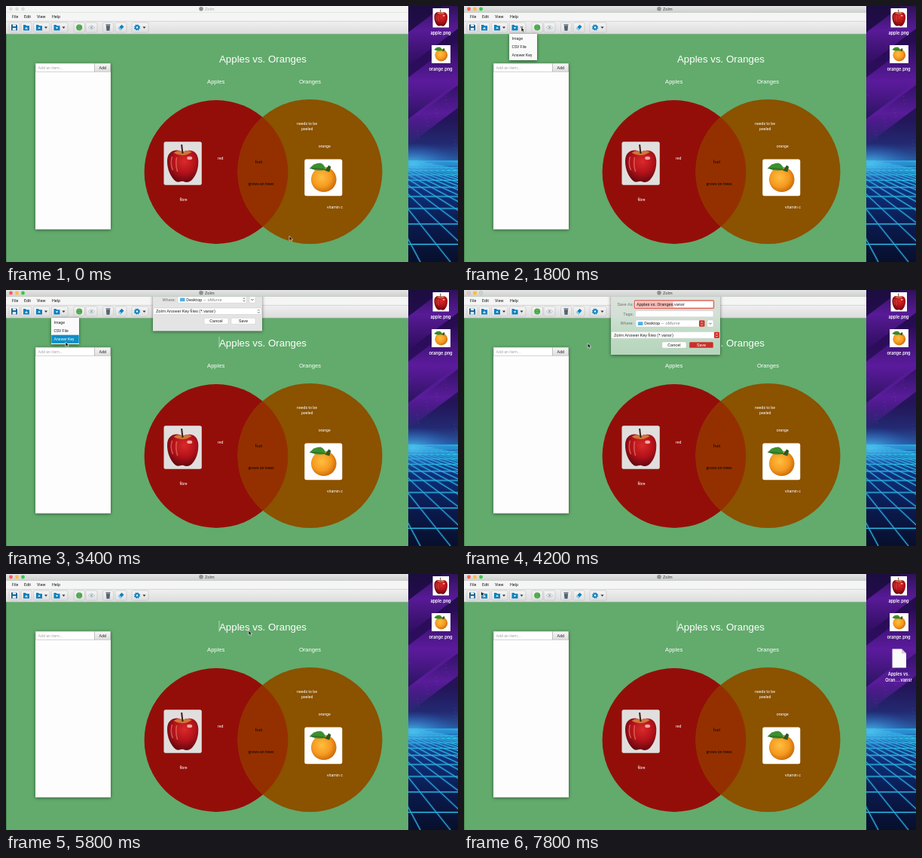
An HTML page for the animation above (8 s loop, 600x340 px).

```html
<!DOCTYPE html>
<html lang="en">
<head>
<meta charset="utf-8">
<title>Diagram editor</title>
<style>
html, body { margin: 0; width: 100%; height: 100%; overflow: hidden; background: #62ab6c; }
svg { display: block; width: 100vw; height: 100vh; }
text { font-family: Roboto, sans-serif; font-size: 5.3px; white-space: pre; }
.head { font-family: "Liberation Sans", Arial, sans-serif; }
.icon { font-family: Inter, sans-serif; font-weight: 600; font-size: 5.6px; }
</style>
</head>
<body>
<svg id="stage" viewBox="0 0 600 340">
  <defs>
    <linearGradient id="sky" x2="0" y2="1">
      <stop offset="0" stop-color="#1c0d40"/><stop offset=".3" stop-color="#2a0c58"/>
      <stop offset=".5" stop-color="#2f0f62"/><stop offset=".72" stop-color="#241458"/>
      <stop offset=".88" stop-color="#232a72"/><stop offset="1" stop-color="#2a62a8"/>
    </linearGradient>
    <linearGradient id="ray" x2="0" y2="1">
      <stop offset="0" stop-color="#6a1fb0" stop-opacity="0"/><stop offset=".5" stop-color="#6a1fb0" stop-opacity=".75"/>
      <stop offset="1" stop-color="#6a1fb0" stop-opacity="0"/>
    </linearGradient>
    <radialGradient id="glow">
      <stop offset="0" stop-color="#4fc4f0" stop-opacity=".85"/><stop offset="1" stop-color="#2a6ad0" stop-opacity="0"/>
    </radialGradient>
    <linearGradient id="floor" x2="0" y2="1">
      <stop offset="0" stop-color="#1d67b0"/><stop offset=".3" stop-color="#0e2f78"/>
      <stop offset=".65" stop-color="#0a1a4c"/><stop offset="1" stop-color="#070f2c"/>
    </linearGradient>
    <linearGradient id="glass" x2="0" y2="1">
      <stop offset="0" stop-color="#dde3de"/><stop offset=".35" stop-color="#d3e0d5"/>
      <stop offset=".65" stop-color="#bfdac4"/><stop offset="1" stop-color="#b6d5bb"/>
    </linearGradient>
    <linearGradient id="bar" x2="0" y2="1">
      <stop offset="0" stop-color="#e6e5e6"/><stop offset="1" stop-color="#d0cfd0"/>
    </linearGradient>
    <linearGradient id="tool" x2="0" y2="1">
      <stop offset="0" stop-color="#f0f0f0"/><stop offset="1" stop-color="#dcdcdc"/>
    </linearGradient>
    <linearGradient id="btn" x2="0" y2="1">
      <stop offset="0" stop-color="#f6f6f6"/><stop offset="1" stop-color="#dedede"/>
    </linearGradient>
    <radialGradient id="redSkin" cx=".55" cy=".35" r=".65">
      <stop offset="0" stop-color="#d92a2a"/><stop offset=".55" stop-color="#b3121a"/>
      <stop offset="1" stop-color="#650710"/>
    </radialGradient>
    <radialGradient id="peel" cx=".42" cy=".42" r=".62">
      <stop offset="0" stop-color="#ffbe40"/><stop offset=".6" stop-color="#f59a20"/>
      <stop offset="1" stop-color="#c96808"/>
    </radialGradient>
    <filter id="shade" x="-20%" y="-20%" width="140%" height="140%">
      <feDropShadow dx="0" dy="1" stdDeviation="2" flood-opacity=".5"/>
    </filter>
    <clipPath id="left"><circle cx="279" cy="220.5" r="95.4"/></clipPath>
    <clipPath id="desk"><rect x="534" width="66" height="340"/></clipPath>
    <clipPath id="ground"><rect x="534" y="205" width="66" height="135"/></clipPath>
    <clipPath id="below"><rect y="9" width="600" height="331"/></clipPath>
    <symbol id="apple" viewBox="0 0 50 58" preserveAspectRatio="none">
      <path d="M25 14C18 9 5 11 4.5 25C4 36 9 48 16 53C20 55 22 52 26 53C30 55 34 54 37 51C43 45 46 35 45.5 25C45 12 34 9 25 14Z" fill="url(#redSkin)"/>
      <path d="M13 15Q25 22 37 14Q31 10 25 14Q19 10 13 15Z" fill="#d0763a"/>
      <path d="M11 20Q8 29 12 38M17 21Q15 30 18 40" stroke="#ef8468" stroke-width="1.6" fill="none" opacity=".6"/>
      <ellipse cx="34" cy="22" rx="3.5" ry="2.2" fill="#ffd5cc" opacity=".75"/>
      <path d="M25 16Q24 10 23.5 4" stroke="#3a1d18" stroke-width="2" fill="none"/>
    </symbol>
    <symbol id="orange" viewBox="0 0 50 49" preserveAspectRatio="none">
      <circle cx="25.5" cy="27" r="16.8" fill="url(#peel)"/>
      <path d="M28 14Q17 17 7 12Q12 5 21 5Q27 7 28 14Z" fill="#3c8f2f"/>
      <path d="M28 14Q18 12 7 12" stroke="#1f5a22" stroke-width=".8" fill="none"/>
      <path d="M27 15L32 8L35 10L33 17Z" fill="#2c5a22"/>
    </symbol>
  </defs>
  <g id="scene"></g>
</svg>
<script>
const $ = id => document.getElementById(id);
const rect = (x, y, w, h, fill, more = '') => `<rect x="${x}" y="${y}" width="${w}" height="${h}" fill="${fill}" ${more}/>`;
const disc = (x, y, r, fill, more = '') => `<circle cx="${x}" cy="${y}" r="${r}" fill="${fill}" ${more}/>`;
const path = (d, fill, more = '') => `<path d="${d}" fill="${fill}" ${more}/>`;
const line = (d, color, w = 1) => path(d, 'none', `stroke="${color}" stroke-width="${w}"`);
const text = (x, y, s, fill = '#222', more = '') => `<text x="${x}" y="${y}" fill="${fill}" ${more}>${s}</text>`;
const mid = 'text-anchor="middle"', end = 'text-anchor="end"';
const size = n => `style="font-size:${n}px"`;
const use = (id, x, y, w, h) => `<use href="#${id}" x="${x}" y="${y}" width="${w}" height="${h}"/>`;
const group = (id, body, more = '') => `<g id="${id}" ${more}>${body}</g>`;
const range = n => [...Array(n).keys()];

function desktop() {
  const ray = (y, h) => path(`M534 ${y}L600 ${y - 50}V${y - 50 + h}L534 ${y + h}Z`, 'url(#ray)');
  const stars = range(16).map(i => disc(536 + i * 37 % 62, 118 + i * 29 % 75, .35, '#b9a8e8')).join('');
  const rows = range(14).map(k => `M534 ${200 + 5 * 1.3 ** k}H600`).join('');
  const cols = range(18).map(i => `M470 190L${470 + (i + 1) * 40} 340`).join('');
  const file = path('M568.5 99.5H581L587 105.5V124.5H568.5Z', '#fafafa') + path('M581 99.5V105.5H587Z', '#cfcfd4');
  const label = (y, s) => text(577, y, s, '#fff', `class="icon" ${mid}`);
  return `<g clip-path="url(#desk)">${rect(534, 0, 66, 208, 'url(#sky)') + ray(35, 45) + ray(95, 60) + ray(150, 35) + stars}
    ${rect(534, 205, 66, 135, 'url(#floor)')}
    <g clip-path="url(#ground)">${line(rows + cols, 'rgba(40,150,230,.3)', 3) + line(rows + cols, '#2fc3e6', 1)}</g>
    <ellipse cx="540" cy="210" rx="60" ry="28" fill="url(#glow)"/></g>
    ${rect(566.5, 3, 21.5, 25.5, '#fff') + use('apple', 566.5, 3, 21.5, 25.5) + label(38, 'apple.png')}
    ${rect(565, 52, 25, 24, '#fff') + use('orange', 565, 52, 25, 24) + label(86.3, 'orange.png')}
    ${group('file', file + label(135, 'Apples vs.') + label(143, 'Oran….vansr'))}`;
}

function toolbar() {
  const blue = '#0f80bd';
  const box = (x, w) => rect(x, 22, w, 13, 'url(#btn)', 'rx="1.5" stroke="#c2c2c2" stroke-width=".6"');
  const drop = x => path(`M${x - 2} 27.5h4l-2 2.4z`, '#333');
  const folder = (x, d) => path(`M${x - 4} 25h3l1 1.2h4v6.3h-8z`, blue) + path(d, '#fff');
  return [[4, 14], [20, 14], [36.5, 21.5], [60.5, 21.5], [90, 14.5], [106, 15], [128.5, 14], [145, 15], [167, 22]].map(b => box(...b)).join('') +
    path('M7 24.5h6.5l1.5 1.5v6.5h-8z', '#17608f') + rect(9, 24.5, 4, 2.6, '#fff') + rect(8.7, 29, 4.6, 3.5, '#dcecf5') +
    folder(27, 'M25 30.5l2-2.5 2 2.5z') + folder(44, 'M42.3 30l1.7-2.3 1.7 2.3z') + folder(67.5, 'M65.8 28.3h3.4l-1.7 2.3z') +
    drop(53) + drop(76.5) + drop(183.5) +
    disc(97.2, 28.5, 4, '#45a846') + line('M95 26.5q2 2 4-.5M94.8 30.5q2-1.4 4.5.4', '#79c777', .7) +
    path('M109.5 28.5q4-5 8 0q-4 5-8 0z', '#eef2f4', 'stroke="#a5b7c3" stroke-width=".8"') + disc(113.5, 28.5, 1.5, '#9ab0bf') +
    path('M133 26.2h5l-.5 6.6h-4z', '#3d4f60') + rect(132.5, 24.4, 6, 1.2, '#3d4f60') + line('M134.7 27v5M136.4 27v5', '#8796a4', .5) +
    path('M149 29.6l4.5-4.8 3 2.8-4.5 4.8z', blue) + path('M149 29.6l1.6-1.7 3 2.8-1.6 1.7z', '#8ed0ea') +
    `<circle cx="174" cy="28.5" r="3.2" fill="none" stroke="${blue}" stroke-width="1.8" stroke-dasharray="1.5 1"/>` +
    disc(174, 28.5, 3, blue) + disc(174, 28.5, 1.2, '#fff');
}

function canvas() {
  const word = (x, y, s, c = '#fff') => text(x, y, s, c, mid + ' ' + size(5.2));
  const head = (x, y, s, n) => text(x, y, s, '#fff', `class="head" ${mid} ${size(n)}`);
  return rect(0, 37, 534, 303, '#62ab6c') + rect(0, 37, 1, 303, '#4c8a56') +
    disc(279, 220.5, 95.4, '#940e09') + disc(403.5, 220, 96, '#8b5200') +
    disc(403.5, 220, 96, '#943000', 'clip-path="url(#left)"') +
    head(341, 74.8, 'Apples vs. Oranges', 13.3) + head(278.7, 102.6, 'Apples', 7.6) + head(403.5, 102.6, 'Oranges', 7.6) +
    rect(209.5, 180.3, 50.3, 57.5, '#e0dfde', 'rx="2.5"') + use('apple', 209.5, 180, 50.3, 58) +
    rect(396.3, 203.5, 50, 48.7, '#fff', 'rx="2.5"') + use('orange', 396.3, 203.5, 50, 48.7) +
    word(284.8, 203.8, 'red') + word(235.5, 259.3, 'fibre') + word(399.5, 157.8, 'needs to be') + word(399.8, 165, 'peeled') +
    word(422.7, 188.4, 'orange') + word(436.5, 269.2, 'vitamin c') + word(335.5, 209, 'fruit', '#0a0500') + word(338.5, 237.5, 'grows on trees', '#0a0500') +
    group('caret', line('M283 62V77', '#e8f4ea', .6)) +
    rect(39, 76, 100, 220.5, '#fdfdfd', 'filter="url(#shade)"') +
    rect(39.2, 76.2, 78.5, 11, '#fff', 'stroke="#b5b5b5" stroke-width=".6"') + text(42.5, 83.6, 'Add an item...', '#a6a6a6') +
    rect(117.7, 76.2, 21, 11, 'url(#btn)', 'stroke="#b0b0b0" stroke-width=".6"') + text(128.3, 83.8, 'Add', '#222', mid);
}

function chrome() {
  const lights = colors => colors.map((c, i) => disc(6.5 + i * 8, 4, 2.4, c)).join('');
  const name = c => disc(259, 3.8, 2.8, '#8f8f8f') + text(264, 5.7, 'Zolm', c, size(5.6));
  const gray = '#d0d0d0';
  return rect(0, 8.5, 534, 12, '#f5f5f5') + rect(0, 20, 534, 17, 'url(#tool)') + line('M0 20.3H534M0 37H534', '#c0c0c0', .6) +
    [[8, 'File'], [24, 'Edit'], [41, 'View'], [61, 'Help']].map(([x, s]) => text(x, 16.4, s, '#111')).join('') + toolbar() +
    group('idle', rect(0, 0, 534, 8.7, '#f4f4f4') + lights(['#dadada', '#dadada', '#dadada']) + name('#a8a8a8')) +
    group('active', rect(0, 0, 534, 8.7, 'url(#bar)') + lights(['#fc5b57', '#fdbc40', '#34c84a']) + name('#444')) +
    group('blocked', lights([gray, '#fdbc40', gray]));
}

function menu() {
  const items = ['Image', 'CSV File', 'Answer Key'];
  return group('menu', rect(60, 37, 37, 35, '#fafafa', 'filter="url(#shade)"') +
    `<rect id="pick" x="60.3" width="36.4" height="11.2" fill="#0b8fc8"/>` +
    items.map((s, i) => `<text class="item" x="63.5" y="${44.6 + i * 11.2}" style="font-size:5.2px">${s}</text>`).join(''));
}

function dialog() {
  const soft = 'stroke="#c8c8c8" stroke-width=".5" rx="1.5"';
  const t = size(5.7);
  const label = (y, s) => text(225, y, s, '#6f7671', end + ' ' + t);
  const steps = (x, y, c) => line(`M${x - 1.3} ${y - .8}l1.3-1.5 1.3 1.5M${x - 1.3} ${y + .8}l1.3 1.5 1.3-1.5`, c, .7);
  const button = (x, s, fill, c) => rect(x, 69, 32, 8, fill, soft) + text(x + 16, 75, s, c, mid + ' ' + t);
  return `<g clip-path="url(#below)">${group('sheet',
    rect(195, 4, 145, 82, '#ececec', 'id="panel" filter="url(#shade)"') +
    label(21.3, 'Save As:') + rect(226.5, 14, 105, 10.3, '#fff', 'stroke="#e5645d" stroke-width="1.5" rx="1"') +
    rect(228.5, 15.5, 49.3, 7.4, '#f3b8b3') +
    text(229, 21.3, 'Apples vs. Oranges.vansr', '#222', t) +
    label(33.8, 'Tags:') + rect(227.7, 27.6, 103.3, 8.2, '#fff', soft) +
    label(46.3, 'Where:') + rect(228, 40, 91.5, 9, '#fff', soft) + rect(231, 42.2, 6.5, 4.8, '#4fb2e4', 'rx=".6"') +
    text(239.3, 46.4, 'Desktop <tspan fill="#858585">— oMurve</tspan>', '#222', t) +
    rect(323, 40, 8, 9, '#fff', soft) + line('M325.3 43.7l1.7 1.8 1.7-1.8', '#444', .8) +
    rect(195.5, 55.6, 143.5, 8.6, '#fff', soft) + text(199, 62, 'Zolm Answer Key files (*.vansr)', '#222', t) +
    button(263, 'Cancel', '#fff', '#222') +
    group('plain', button(299, 'Save', '#fff', '#222') + steps(316, 44.5, '#444') + steps(335.5, 60, '#444')) +
    group('tinted', rect(312, 40.2, 7.5, 8.6, '#d0342c', 'rx="1.3"') + steps(315.8, 44.5, '#fff') +
      rect(332, 55.8, 7, 8.2, '#d0342c', 'rx="1.3"') + steps(335.5, 60, '#fff') + button(299, 'Save', '#c92f29', '#fff')))}</g>`;
}

const arrow = path('M0 0V6.2L1.5 4.9L2.6 7.2L3.7 6.7L2.7 4.5H4.6Z', '#111', 'stroke="#fff" stroke-width=".6"');
const beam = line('M-1.5 -4.5Q0 -4.5 0 -3.5V3.5Q0 4.5 -1.5 4.5M1.5 -4.5Q0 -4.5 0 -3.5M0 3.5Q0 4.5 1.5 4.5', '#e4efe6', .8);
$('scene').innerHTML = desktop() + canvas() + chrome() + menu() + dialog() +
  group('cursor', group('arrow', arrow) + group('beam', beam));

// time, x, y
const route = [
  [0, 376, 305.5], [1200, 55, 26], [1600, 75, 27], [1800, 76, 28], [2400, 79, 55], [2800, 79, 66],
  [3000, 79, 69], [3800, 79, 69], [4800, 321, 74], [5200, 322, 75], [6200, 322, 75], [6600, 321, 71],
  [6800, 319, 69], [7800, 22.5, 23], [8000, 12, 25]
];
const lerp = (a, b, k) => a + (b - a) * k;
const clamp = k => Math.max(0, Math.min(1, k));
const ease = k => k * k * (3 - 2 * k);

function place(t) {
  const i = route.findIndex(p => p[0] > t);
  const [a, b] = [route[i - 1], route[i]];
  const k = ease((t - a[0]) / (b[0] - a[0]));
  return [lerp(a[1], b[1], k), lerp(a[2], b[2], k)];
}

const show = (id, on) => $(id).setAttribute('display', on ? 'inline' : 'none');
const move = (id, x, y) => $(id).setAttribute('transform', `translate(${x} ${y})`);

function draw(t) {
  const [x, y] = place(t);
  move('cursor', x, y);
  const overTitle = x > 283 && x < 400 && y > 61 && y < 79 && (t < 3200 || t > 5800);
  show('beam', overTitle);
  show('arrow', !overTitle);

  const focused = t >= 1600;
  show('active', focused);
  show('idle', !focused);

  show('menu', t >= 1800 && t < 3600);
  const row = y < 37 ? -1 : Math.min(2, Math.floor((y - 37) / 11.3));
  show('pick', row >= 0);
  $('pick').setAttribute('y', 37.3 + Math.max(0, row) * 11.2);
  document.querySelectorAll('.item').forEach((n, i) => n.setAttribute('fill', i === row ? '#fff' : '#222'));

  const open = t < 5000 ? clamp((t - 3200) / 340) : 1 - clamp((t - 5400) / 400);
  const settled = open === 1;
  show('sheet', open > 0);
  move('sheet', 0, -77 * (1 - open));
  show('tinted', settled);
  show('plain', !settled);
  show('blocked', settled);
  $('panel').setAttribute('fill', settled ? 'url(#glass)' : '#e4e4e4');

  show('file', t >= 6000);
  const blink = t >= 5800 ? (t - 5750) % 1000 < 500 : t >= 2800 && t % 1000 < 500;
  show('caret', blink);
}

function tick(now) {
  draw(Math.floor(now % 8000 / 200) * 200);
  requestAnimationFrame(tick);
}
draw(0);
requestAnimationFrame(tick);
</script>
</body>
</html>
```
